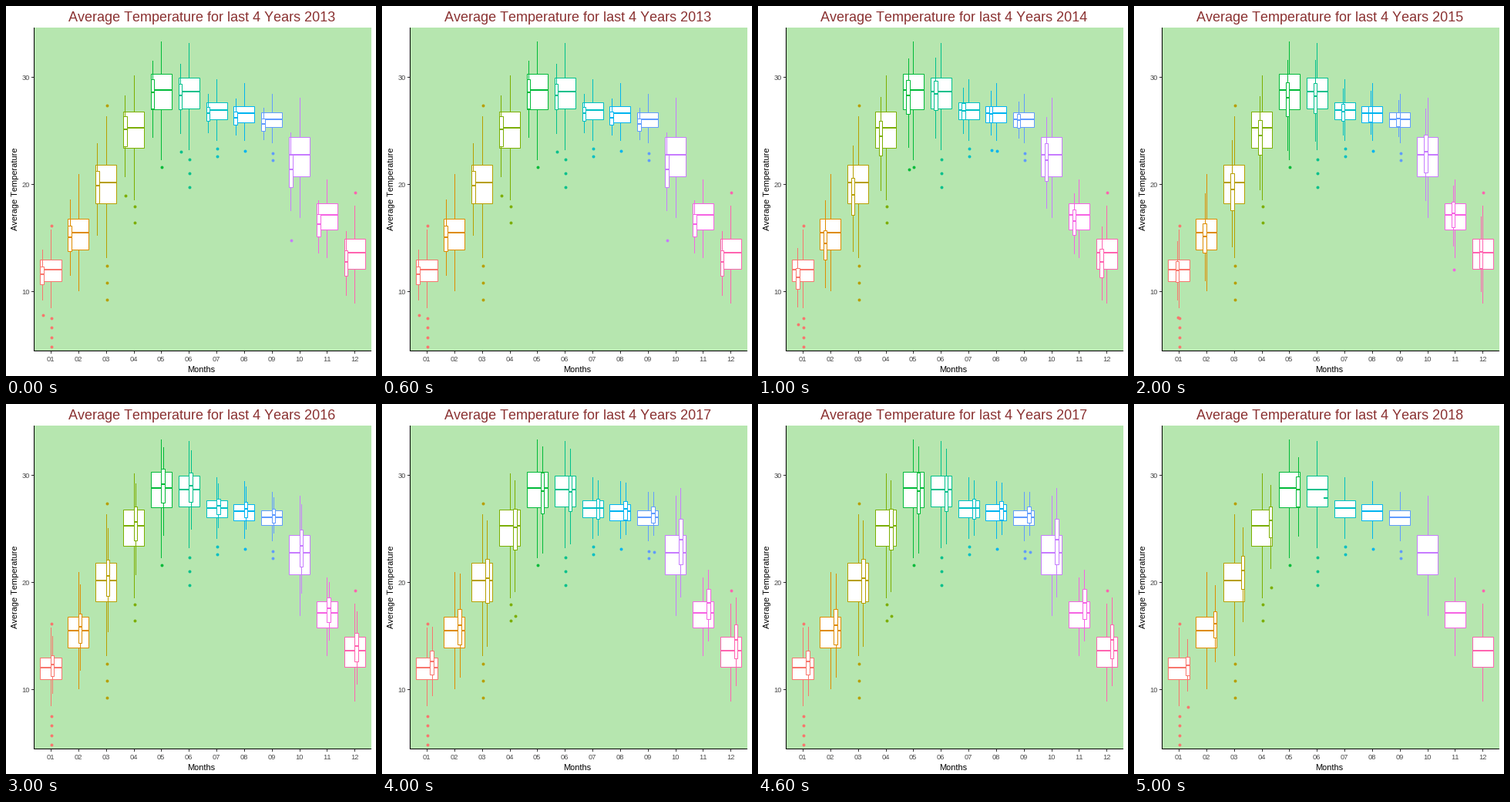
These frames come from a looping animation (480 by 480 pixels, 6 s). A matplotlib script:

```python
import matplotlib.pyplot as plt
from matplotlib.animation import FuncAnimation
from matplotlib.patches import Rectangle
from math import cos, sin, pi

plt.rcParams["font.family"] = "Liberation Sans"
plt.rcParams["text.kerning_factor"] = 6  # unkerned text

PX = 0.75  # points per pixel at 96 dpi
X0, STEP, BOX_W = 58, 35.85, 27
COLORS = ["#F8766D", "#DE8C00", "#B79F00", "#7CAE00", "#00BA38", "#00C08B",
          "#00BFC4", "#00B4F0", "#619CFF", "#C77CFF", "#F564E3", "#FF64B0"]

# Seasonal key points in stage pixels, and outlier counts per month
MEDIAN = [342, 294, 229, 158, 109, 111, 135, 139, 147, 193, 271, 320]
HEIGHT = [28, 40, 50, 47, 46, 40, 22, 21, 19, 51, 34, 39]
LOW_DOTS = [4, 0, 3, 2, 1, 3, 2, 1, 2, 0, 0, 0]
HIGH_DOTS = [1, 0, 1, 0, 0, 0, 0, 0, 0, 0, 0, 1]

# Per year: mean shift, sine and cosine part, spread, months with an outlier
YEARS = [
    (0.21, -0.16, 0.02, 0.83, (1, 4, 6, 10)),
    (0.19, 0.05, 0.16, 0.96, (1, 5, 8)),
    (0.07, 0.15, -0.02, 0.97, (1, 11)),
    (-0.14, 0.03, 0.00, 0.94, ()),
    (-0.15, 0.19, -0.14, 1.14, (4, 9)),
    (0.20, -0.35, -0.30, 0.85, (1, 4)),
]
LAST_MONTHS = 6  # the last year stops on the first day of June

fig = plt.figure(figsize=(5, 5), dpi=96, facecolor="white")
ax = fig.add_axes([0, 0, 1, 1])
ax.set_xlim(0, 480)
ax.set_ylim(480, 0)
ax.set_autoscale_on(False)
ax.axis("off")


def mid_px(v):
    return round(v) + 0.5


def line(xs, ys, color, width=1):
    return ax.plot(xs, ys, color=color, lw=width * PX, snap=False,
                   solid_capstyle="butt")[0]


def label(x, y, text, size, color, ha="center", **kw):
    return ax.text(x, y, text, size=size * PX, color=color, ha=ha,
                   va="baseline", **kw)


def box(m, offset, width, mid, h, reach=1, low=0, high=0):
    """Draw the box plot of month m around the median height mid."""
    x, color = X0 + STEP * m + offset, COLORS[m]
    left, cx, right = (mid_px(x + s * width / 2) for s in (-1, 0, 1))
    top, base = mid_px(mid - 0.45 * h), mid_px(mid + 0.55 * h)
    up = reach * h * (1.2 + 0.28 * cos(pi / 3 * (m - 0.75)))
    down = reach * h * (1.24 + 0.2 * cos(pi / 6 * (m - 3)))

    dots = [base + 1.5 * h + 4 + 0.45 * h * j for j in range(low)]
    dots += [top - 1.5 * h - 3] * high
    parts = ax.plot([cx] * len(dots), [mid_px(d) for d in dots], "o",
                    color=color, ms=3.9 * PX, mew=0)
    parts.append(line([cx, cx], [round(top - up), top], color))
    parts.append(line([cx, cx], [base, round(base + down)], color))
    if h:
        parts.append(ax.add_patch(Rectangle(
            (left, top), right - left, base - top, fc="white", ec=color,
            lw=PX, joinstyle="miter", snap=False, zorder=2)))
    parts.append(line([left - 0.5, right + 0.5], [round(mid)] * 2, color, 2))
    return parts


def year_boxes(k):
    mean, s, c, spread, strays = YEARS[k]
    last = k == len(YEARS) - 1
    slot = BOX_W / len(YEARS)
    parts = []
    for m in range(LAST_MONTHS if last else 12):
        a = pi / 6 * m
        mid = MEDIAN[m] + HEIGHT[m] * (mean + s * sin(a) + c * cos(a))
        single = last and m == LAST_MONTHS - 1
        h = 0 if single else HEIGHT[m] * spread
        parts += box(m, (k - 2.5) * slot, slot, mid, h, 0.7,
                     int(m + 1 in strays))
    return parts


ax.add_patch(Rectangle((36, 28), 438, 419, fc="#B6E6AF", lw=0))
for m in range(12):
    box(m, 0, BOX_W, MEDIAN[m], HEIGHT[m], 1, LOW_DOTS[m], HIGH_DOTS[m])
groups = [year_boxes(k) for k in range(len(YEARS))]

line([36.5, 36.5], [28, 448], "black")
line([36, 474], [447.5, 447.5], "black")
for value in (10, 20, 30):
    y = mid_px(510 - 13.95 * value)
    line([33, 36], [y, y], "#333333")
    label(31, y + 3.5, str(value), 9.3, "#4D4D4D", "right")
for m in range(12):
    x = mid_px(X0 + STEP * m)
    line([x, x], [448, 451], "#333333")
    label(x - 0.5, 461, f"{m + 1:02d}", 9.3, "#4D4D4D")

label(253.5, 475, "Months", 11, "black")
label(15, 237, "Average Temperature", 11, "black", rotation=90,
      rotation_mode="anchor")
title = label(254.5, 20, "", 18, "#8B3232")


def update(k):
    title.set_text(f"Average Temperature for last 4 Years {2013 + k}")
    for j, group in enumerate(groups):
        for part in group:
            part.set_visible(j == k)
    return [title]


anim = FuncAnimation(fig, update, frames=len(YEARS), interval=1000,
                     init_func=lambda: update(0), repeat=True, repeat_delay=0)
plt.show()
```
